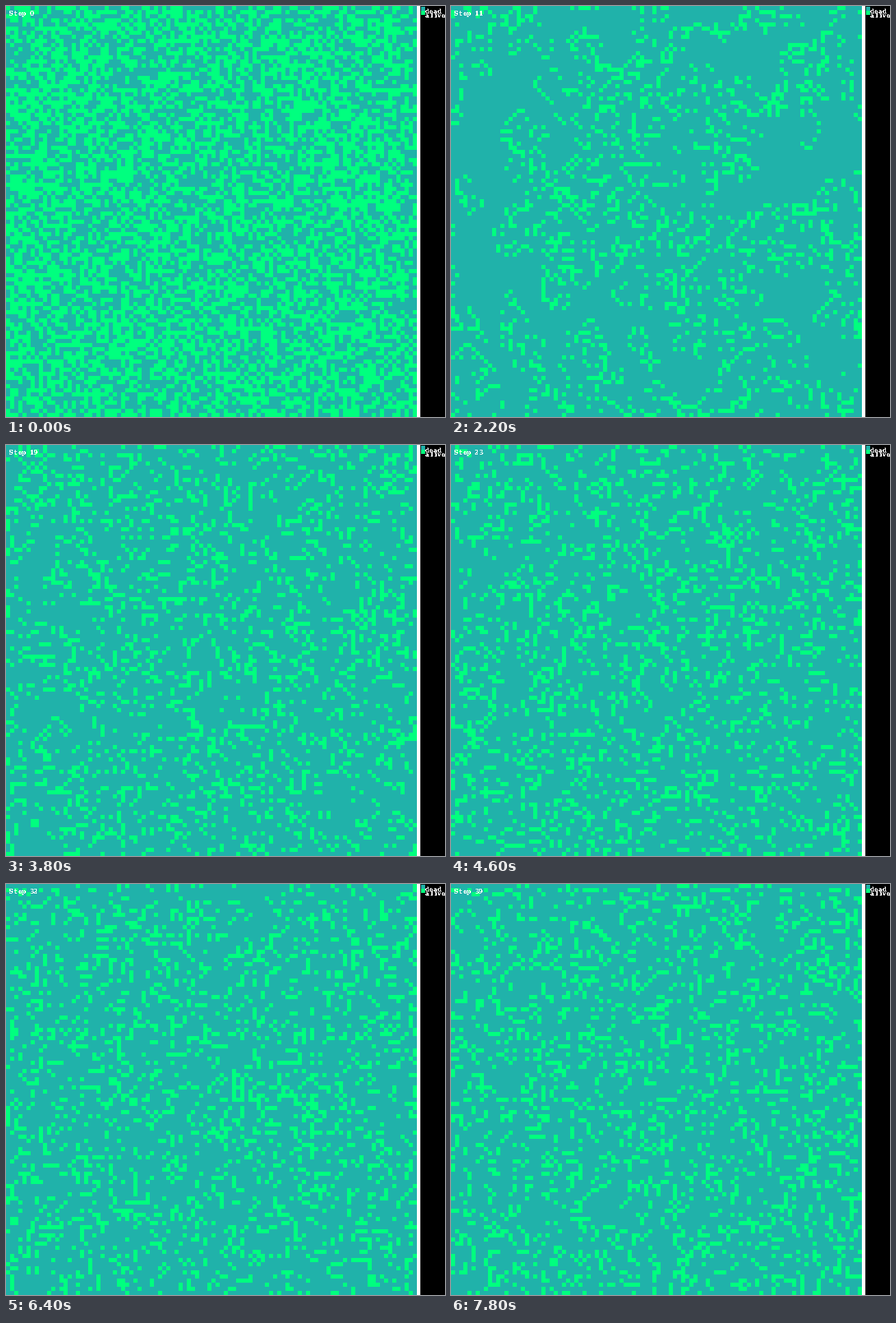
These frames come from a looping animation (641 px wide and 600 px high, 8 s). A matplotlib script:

```python
import numpy as np
import matplotlib.pyplot as plt
from matplotlib.animation import FuncAnimation
from matplotlib.colors import ListedColormap
from matplotlib.patches import Rectangle

W, H = 641, 600
DPI = 100
N = 100          # cells per side
CELL = 6         # pixels per cell, also the text pitch
STEPS = 40
STEP_MS = 200
DEAD, ALIVE = "#20b2aa", "#00ff7f"

plt.rcParams["text.antialiased"] = False
plt.rcParams["toolbar"] = "None"

# Slightly crowded patches (x, y, radius): these starve first.
CROWDED = [(510, 245, 55), (405, 445, 45), (110, 80, 40), (60, 170, 35),
           (395, 30, 30), (205, 300, 30), (45, 405, 28), (150, 500, 30),
           (470, 495, 28)]


def first_grid():
    rng = np.random.default_rng(12)
    y, x = (np.mgrid[0:N, 0:N] + 0.5) * CELL
    density = np.full((N, N), 0.51)
    for cx, cy, r in CROWDED:
        density += 0.1 * np.exp(-((x - cx) ** 2 + (y - cy) ** 2) / r ** 2)
    return rng.random((N, N)) < density


def advance(grid):
    """Seeds rule: birth on exactly two neighbours, no survival."""
    g = grid.astype(int)
    near = sum(np.roll(g, (dy, dx), (0, 1))
               for dy in (-1, 0, 1) for dx in (-1, 0, 1) if dy or dx)
    return ~grid & (near == 2)


grids = [first_grid()]
for _ in range(STEPS - 1):
    grids.append(advance(grids[-1]))

fig = plt.figure(figsize=(W / DPI, H / DPI), dpi=DPI, facecolor="white")
ax = fig.add_axes([0, 0, 1, 1])
ax.axis("off")

board = ax.imshow(grids[0], cmap=ListedColormap([DEAD, ALIVE]), vmin=0, vmax=1,
                  extent=(0, N * CELL, N * CELL, 0), interpolation="nearest",
                  aspect="auto")
ax.set_xlim(0, W)
ax.set_ylim(H, 0)


def rect(x, y, w, h, color):
    ax.add_patch(Rectangle((x, y), w, h, fc=color, lw=0, antialiased=False))


def mono_text(x, baseline, text):
    """Fixed-pitch lettering, one glyph per column."""
    return [ax.text(x + (i + 0.5) * CELL, baseline, ch, color="white",
                    family="DejaVu Serif", weight="bold", size=9 * 72 / DPI,
                    ha="center", va="baseline")
            for i, ch in enumerate(text)]


rect(605, 0, W - 605, H, "black")
rect(606, 1, 6, 6, DEAD)
rect(606, 7, 6, 6, ALIVE)
mono_text(612, 11, "dead")
mono_text(612, 17, "alive")
label = mono_text(5, 14, "Step 0 ")


def draw(step):
    board.set_data(grids[step])
    for glyph, ch in zip(label, f"Step {step}".ljust(7)):
        glyph.set_text(ch)
    return [board, *label]


anim = FuncAnimation(fig, draw, frames=STEPS, interval=STEP_MS,
                     init_func=lambda: draw(0), repeat=True, repeat_delay=0)
plt.show()
```
